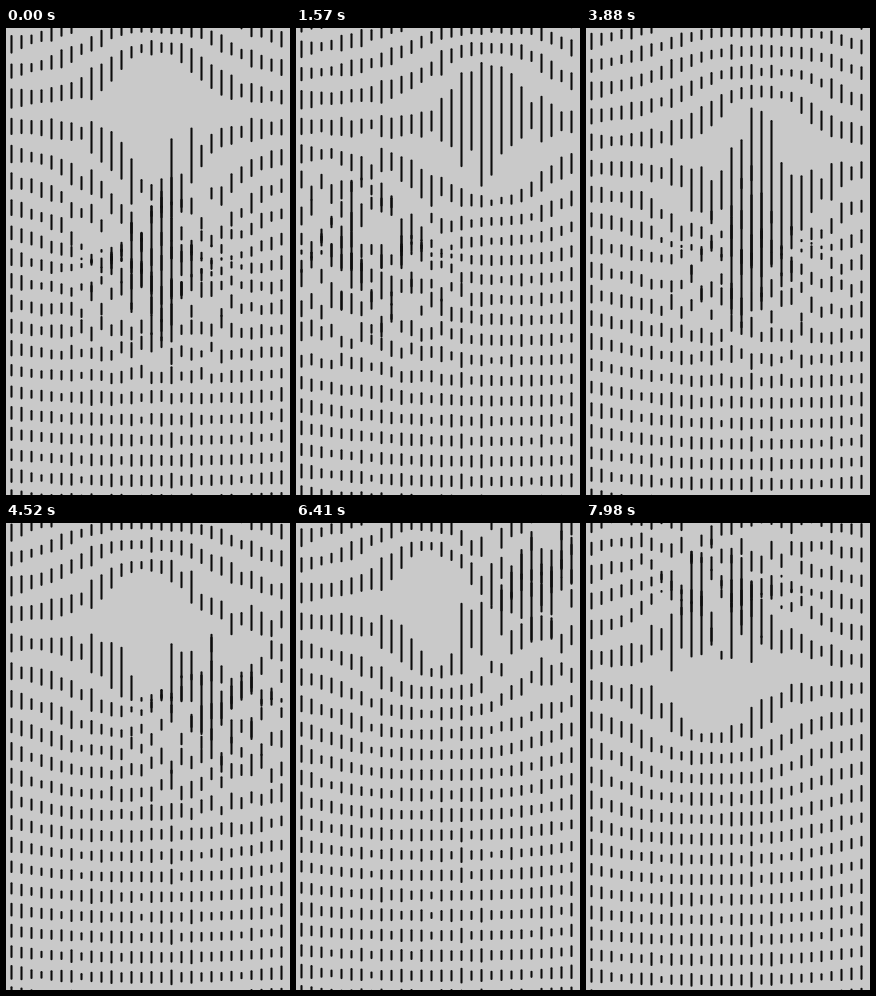
An HTML page with a canvas that plays this animation: 284 px wide and 467 px high, repeating every 8 s.

```html
<!DOCTYPE html>
<html lang="en">
<head>
<meta charset="utf-8">
<title>Moving dash field</title>
<style>
  html, body { margin: 0; width: 100%; height: 100%; overflow: hidden; background: #c9c9c9; }
  canvas { display: block; }
</style>
</head>
<body>
<canvas id="stage" width="284" height="467"></canvas>
<script>
const ctx = document.getElementById('stage').getContext('2d');
const WIDTH = 284, HEIGHT = 467, LOOP = 8;
const COLUMNS = 28, COLUMN_GAP = 10, ROW_GAP = 21.7, FIRST_ROW = 31;

function random(seed) {
  const n = Math.sin(seed * 127.1 + 31.7) * 43758.5453;
  return n - Math.floor(n);
}

const dashes = [];
for (let column = 0; column < COLUMNS; column++) {
  for (let row = -6; row < 24; row++) {
    const seed = column * 53 + row + 7;
    const size = 0.5 * random(column + 1) + 0.5 * random(seed);
    dashes.push({
      x: 5.5 + column * COLUMN_GAP,
      y: FIRST_ROW + row * ROW_GAP,
      half: 2 + size * 6,
      pull: 0.2 + 1.1 * random(seed + 5000)
    });
  }
}

// Both centres wander along sums of slow waves
const hole = t => ({
  x: 150 + 25 * Math.cos(0.6 * (t - 1.6)) + 20 * Math.cos(2.65 * (t - 1.5)),
  y: 113 + 35 * Math.cos(1.23 * (t - 3.2))
});
const knot = t => ({
  x: 160 - 88 * Math.sin(0.8 * t + 0.1),
  y: 148 + 102 * Math.cos(0.42 * (t - 1.2)) - 28 * Math.sin(1.25 * t + 0.2)
});

// Vertical direction away from a centre, from -1 to 1, sharpest on its own column
function away(dx, dy) {
  return dy / (Math.hypot(dx * dx / 130, dy) + 0.01);
}

function pushOut(x, y, center) {
  const dx = x - center.x, dy = y - center.y;
  return y + 56 * Math.max(0, 1 - Math.hypot(dx, dy) / 750) * away(dx, dy);
}

function pullThrough(x, y, center, strength) {
  const dx = x - center.x, dy = y - center.y;
  const near = Math.exp(-(dx * dx + dy * dy) / 6400);
  return y - 75 * strength * near * away(dx, dy);
}

function draw(t) {
  const holeAt = hole(t), knotAt = knot(t);
  ctx.fillStyle = '#c9c9c9';
  ctx.fillRect(0, 0, WIDTH, HEIGHT);
  ctx.strokeStyle = '#0c0c0c';
  ctx.lineWidth = 2.1;
  ctx.lineCap = 'round';
  for (const { x, y, half, pull } of dashes) {
    const place = end => pullThrough(x, pushOut(x, end, holeAt), knotAt, pull);
    ctx.beginPath();
    ctx.moveTo(x, place(y - half));
    ctx.lineTo(x, place(y + half));
    ctx.stroke();
  }
}

const start = performance.now();
function tick() {
  draw((performance.now() - start) / 1000 % LOOP);
  requestAnimationFrame(tick);
}
tick();
</script>
</body>
</html>
```
